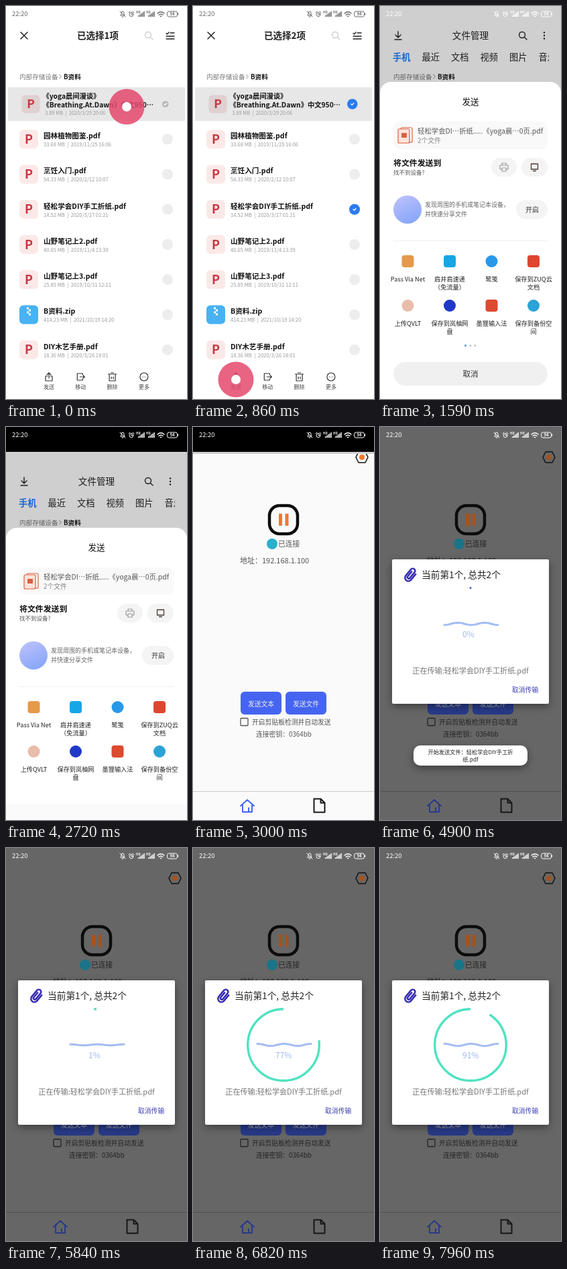
Animation of 270 by 585 pixels, one loop 8 s. Source, as an HTML page with a canvas:

```html
<!DOCTYPE html>
<html lang="zh-CN">
<head>
<meta charset="utf-8">
<style>
html, body { margin: 0; width: 100%; height: 100%; overflow: hidden; background: #fff; }
canvas { display: block; width: 100vw; height: 100vh; }
</style>
</head>
<body>
<canvas id="stage"></canvas>
<script>
const W = 270, H = 585, LOOP = 8000;
const canvas = document.getElementById('stage');
const c = canvas.getContext('2d');
const ratio = window.devicePixelRatio || 1;
canvas.width = W * ratio;
canvas.height = H * ratio;

// The screen refreshes at uneven moments: [first, last, count]
const ticks = [
  [0, 0, 1], [80, 80, 1], [290, 530, 4], [740, 1380, 12], [1590, 1590, 1], [1710, 1990, 5],
  [2270, 2510, 3], [2720, 2720, 1], [2800, 3200, 6], [3240, 3400, 2], [3560, 4080, 8],
  [4240, 4450, 2], [4700, 4900, 4], [4980, 5140, 2], [5300, 5550, 2], [5840, 6040, 3],
  [6200, 6410, 2], [6660, 6820, 3], [6940, 7060, 2], [7270, 7430, 2], [7680, 7960, 4]
].flatMap(([a, b, n]) => Array.from({ length: n }, (_, i) => n > 1 ? a + (b - a) * i / (n - 1) : a));

const mix = (a, b, k) => a + (b - a) * k;

// Piecewise linear value over time
function track(t, points) {
  if (t <= points[0][0]) return points[0][1];
  for (let i = 1; i < points.length; i++) {
    const [t0, a] = points[i - 1], [t1, b] = points[i];
    if (t < t1) return mix(a, b, (t - t0) / (t1 - t0));
  }
  return points[points.length - 1][1];
}

function text(s, x, y, size, color, weight = 400, align = 'left') {
  c.font = `${weight} ${size}px "Noto Sans CJK SC", "Noto Sans CJK", sans-serif`;
  c.fillStyle = color;
  c.textAlign = align;
  c.fillText(s, x, y + size * 0.37);
}
const centered = (s, x, y, size, color, weight) => text(s, x, y, size, color, weight, 'center');

function box(x, y, w, h, r, color) {
  c.beginPath();
  c.roundRect(x, y, w, h, r);
  c.fillStyle = color;
  c.fill();
}
function card(x, y, w, h, r, color) {
  c.save();
  c.shadowColor = 'rgba(0,0,0,.4)';
  c.shadowBlur = 12 * ratio;
  c.shadowOffsetY = 4 * ratio;
  box(x, y, w, h, r, color);
  c.restore();
}
function frame(x, y, w, h, r, color, width) {
  c.beginPath();
  c.roundRect(x, y, w, h, r);
  c.strokeStyle = color;
  c.lineWidth = width;
  c.stroke();
}
function disc(x, y, r, color) {
  c.beginPath();
  c.arc(x, y, r, 0, Math.PI * 2);
  c.fillStyle = color;
  c.fill();
}
function icon(d, x, y, color, width = 1.3, turn = 0) {
  c.save();
  c.translate(x, y);
  c.rotate(turn);
  c.strokeStyle = color;
  c.lineWidth = width;
  c.lineCap = c.lineJoin = 'round';
  c.stroke(new Path2D(d));
  c.restore();
}
function layer(draw, { dx = 0, dy = 0, alpha = 1, scale = 1 } = {}) {
  c.save();
  c.translate(dx, dy);
  c.scale(scale, scale);
  c.globalAlpha = alpha;
  draw();
  c.restore();
}
const shade = alpha => box(0, 0, W, H, 0, `rgba(0,0,0,${alpha})`);

const ICONS = {
  close: 'M-5-5L5 5M5-5L-5 5',
  search: 'M3.5-1A4.5 4.5 0 1 1-5.5-1A4.5 4.5 0 1 1 3.5-1M2.5 2.5L6 6',
  checklist: 'M-6-3.5l1.5 1.5 2.5-3M0-4h6M-6 1h12M-6 5h12',
  download: 'M0-6V3M-4-1L0 3L4-1M-5 6H5',
  send: 'M-2-1H-5V6H5V-1H2M0 2V-6M-3-3L0-6L3-3',
  move: 'M3-3V-5H-5V5H3V3M-1 0H6M4-2L6 0L4 2',
  trash: 'M-6-4H6M-4.5-4V6H4.5V-4M-2-6H2M-1.5 0V3M1.5 0V3',
  more: 'M6 0A6 6 0 1 1-6 0A6 6 0 1 1 6 0M-2.5 0h.1M0 0h.1M2.5 0h.1',
  tick: 'M-2 0L-.5 1.5L2-1.5',
  printer: 'M-3-3V-6H3V-3M-3 3H-6V-3H6V3H3M-3 1H3V6H-3Z',
  monitor: 'M-5-5H5V3H-5ZM-2 5.5H2',
  clip: 'M5-6V5A5 5 0 0 1-5 5V-7A3.5 3.5 0 0 1 2-7V4A2 2 0 0 1-2 4V-5',
  bell: 'M-3 2H3L2 0V-2A2 2 0 0 0-2-2V0ZM-1 4H1M-4-4L4 4',
  alarm: 'M3 .5A3 3 0 1 1-3 .5A3 3 0 1 1 3 .5M0-1V.5H1.5M-4-2L-2-4M4-2L2-4',
  hexagon: 'M-9 0L-5-8H5L9 0L5 8H-5Z',
  home: 'M-10 0L0-9L10 0M-7-1V9H7V-1M2 9V3',
  page: 'M2-10H-8V10H8V-4ZM2-10V-4H8'
};

function statusBar(color) {
  text('22:20', 9, 12, 9.4, color, 500);
  icon(ICONS.bell, 174, 12, color, 1);
  icon(ICONS.alarm, 187, 12, color, 1);
  for (const x of [194, 209]) {
    text('HD', x, 9, 4.5, color, 600);
    for (let i = 0; i < 5; i++) box(x + 3 + i * 2.1, 14 - i * 1.5, 1.4, 2 + i * 1.5, 0, color);
  }
  icon('M-5-1.5Q0-6 5-1.5M-3 .8Q0-2 3 .8M-.8 3L0 2.5L.8 3', 231, 12.5, color, 1.4);
  frame(240.5, 8, 15, 8, 2.8, color, 1);
  box(256.2, 10.5, 1, 3, 0, color);
  centered('94', 248, 12, 6, color, 600);
}

const FILES = [
  ['《Breathing.At.Dawn》中文950…', '3.89 MB  |  2020/3/29 20:06'],
  ['园林植物图鉴.pdf', '33.68 MB  |  2019/11/25 16:06'],
  ['烹饪入门.pdf', '54.33 MB  |  2020/2/12 10:07'],
  ['轻松学会DIY手工折纸.pdf', '14.52 MB  |  2020/3/27 01:21'],
  ['山野笔记上2.pdf', '40.65 MB  |  2019/11/4 13:39'],
  ['山野笔记上3.pdf', '25.85 MB  |  2019/10/31 12:11'],
  ['B资料.zip', '414.23 MB  |  2021/10/19 14:20'],
  ['DIY木艺手册.pdf', '18.36 MB  |  2020/3/26 18:01']
];

function fileRow([name, info], i, selected, fresh) {
  const first = i === 0;
  if (name.endsWith('zip')) {
    box(20, -14, 28, 28, 6, '#48b2f2');
    for (let k = 0; k < 4; k++) box(k % 2 ? 34 : 31, -11 + k * 3, 3, 3, 0, '#fff');
  } else {
    box(20, -14, 28, 28, 6, first ? '#dfd0d1' : '#fbe9e8');
    centered('P', 34, 0, 18, '#cb3440', 700);
  }
  if (first) text('《yoga晨间漫谈》', 52, -12, 10.6, '#111', 600);
  text(name, first ? 52 : 56, first ? 1 : -5, 10.6, '#111', 600);
  text(info, 56, first ? 14 : 8, 7.6, '#999');
  disc(241, 0, fresh ? 5 : 8, fresh ? '#b9b9b9' : selected ? '#2b7cf0' : '#ededed');
  if (selected) icon(ICONS.tick, 241, 0, '#fff', 1.2);
}

function selectionHeader(count) {
  icon(ICONS.close, 27, 44, '#222', 1.5);
  centered(`已选择${count}项`, 137, 44, 13.5, '#222', 600);
  icon(ICONS.search, 213, 44, '#ccc');
  icon(ICONS.checklist, 245, 44, '#222');
}

function browseHeader() {
  icon(ICONS.download, 27, 44, '#222', 1.4);
  centered('文件管理', 135, 44, 13.6, '#222', 500);
  icon(ICONS.search, 213, 44, '#222', 1.4);
  for (const y of [39.5, 44, 48.5]) disc(245, y, 1.2, '#222');
  c.save();
  c.beginPath();
  c.rect(0, 60, 252, 30);
  c.clip();
  ['手机', '最近', '文档', '视频', '图片', '音乐'].forEach((tab, i) =>
    text(tab, 19 + i * 43.5, 76, 13.2, i ? '#222' : '#1c7dff', i ? 500 : 600));
  c.restore();
}

function toolbar() {
  box(0, 532, W, 53, 0, '#fff');
  [['send', '发送'], ['move', '移动'], ['trash', '删除'], ['more', '更多']].forEach(([name, label], i) => {
    const x = 64 + i * 47.3;
    icon(ICONS[name], x, 552, '#333', 1.2);
    centered(label, x, 567, 8, '#444');
  });
}

function filesPage(t) {
  const two = t >= 450;
  box(0, 0, W, H, 0, '#fff');
  if (t < 1100) selectionHeader(two ? 2 : 1);
  else browseHeader();
  text('内部存储设备', 20, 105, 9.6, '#777');
  icon('M-1.5-3L1.5 0L-1.5 3', 81, 105, '#888', 1);
  text('B资料', 86, 105, 9.6, '#111', 600);
  box(3, 121, 264, 50, 0, '#e7e7e7');
  FILES.forEach((file, i) => {
    const pressed = i === 0;
    layer(() => fileRow(file, i, pressed || (i === 3 && two), pressed && t < 80),
      { dx: pressed ? 4 : 0, dy: 146 + i * 52.25, scale: pressed ? 0.97 : 1 });
  });
  toolbar();
  shade(track(t, [[1100, 0], [1380, 0.1], [1590, 0.19]]));
}

const APPS = [
  ['#e59a4a', 0, 'Pass Via Net'], ['#16a6e6', 0, '肩并肩速递', '（免流量）'],
  ['#2898ea', 1, '鹭笺'], ['#de4630', 0, '保存到ZUQ云', '文档'],
  ['#e8bda9', 1, '上传QVLT'], ['#2038c8', 1, '保存到岚柚网', '盘'],
  ['#dc4a30', 0, '墨狸输入法'], ['#2ba3d6', 1, '保存到备份空', '间']
];

function shareSheet(leaving) {
  box(0, 113, W, 600, [16, 16, 0, 0], '#fff');
  centered('发送', 135, 142, 12.6, '#111', 500);
  box(20, 172, 230, 41, 10, '#f9f9f9');
  frame(31, 181, 17, 22, 2, '#d9603f', 1.2);
  box(27, 183, 17, 21, 2, '#fbe3da');
  frame(27, 183, 17, 21, 2, '#d9603f', 1.2);
  box(32, 189, 8, 7, 1, '#d9603f');
  text('轻松学会DI…折纸.....《yoga晨…0页.pdf', 56, 186, 10.4, '#555');
  text('2个文件', 56, 200, 9.8, '#888');
  text('将文件发送到', 20, 234, 11.9, '#111', 600);
  text('找不到设备?', 20, 248, 8.5, '#555');
  box(166, 226, 38, 28, 14, '#f4f4f4');
  box(211, 226, 39, 28, 14, '#f4f4f4');
  icon(ICONS.printer, 185, 240, '#999', 1.2);
  icon(ICONS.monitor, 230.5, 240, '#4a3a36', 1.3);
  const glow = c.createLinearGradient(30, 284, 50, 324);
  glow.addColorStop(0, '#b9bffa');
  glow.addColorStop(1, '#86a5fb');
  disc(41, 303, 21, glow);
  text('发现周围的手机或笔记本设备，', 67, 296, 9, '#666');
  text('并快速分享文件', 67, 310, 9, '#666');
  box(203, 289, 47, 28, 14, '#f4f4f4');
  centered('开启', 227, 303, 10, '#333', 500);
  box(20, 349, 230, 1, 0, '#efefef');
  APPS.forEach(([color, round, ...label], i) => {
    const x = 41.5 + (i % 4) * 62.5, y = 380 + (i >> 2) * 66;
    if (round) disc(x, y, 9, color);
    else box(x - 9, y - 9, 18, 18, 4, color);
    label.forEach((line, k) => centered(line, x, y + 27 + k * 12, 9.2, '#222'));
  });
  if (leaving) return;
  [127.5, 135, 142].forEach((x, i) => disc(x, 505.5, 1.7, i ? '#ccc' : '#6f9df5'));
  box(20, 530, 230, 35, 17.5, '#f0f0f0');
  centered('取消', 135, 548, 11.6, '#333', 500);
}

const LIT = { paper: '#fafafa', orange: '#f0792c', teal: '#2ab0cc', blue: '#4565f0', label: '#eee', ink: '#555', line: '#ccc' };
const DIM = { paper: '#666', orange: '#a4531f', teal: '#1a7488', blue: '#283a88', label: '#aaa', ink: '#242424', line: '#505050' };

function transferPage({ paper, orange, teal, blue, label, ink, line }) {
  box(0, 0, W, H, 0, paper);
  icon(ICONS.hexagon, 252, 45, '#111', 1.5);
  disc(252, 45, 4, orange);
  frame(114, 117, 42, 42, 15, '#0c0c0c', 4.5);
  box(128, 129, 5, 18, 1, orange);
  box(137.5, 129, 5, 18, 1, orange);
  disc(118, 174, 8, teal);
  text('已连接', 127, 174, 10.8, ink);
  text('地址：192.168.1.100', 70, 199, 11, ink, 500);
  [['发送文本', 71], ['发送文件', 138]].forEach(([name, x]) => {
    box(x, 394, 61, 34, 6, blue);
    centered(name, x + 30.5, 412, 9.8, label, 500);
  });
  frame(71, 433.5, 11, 11, 1, ink, 1.3);
  text('开启剪贴板检测并自动发送', 88, 439, 9.8, ink);
  text('连接密钥：0364bb', 94, 457, 9.8, ink);
  box(0, 542, W, 1, 0, line);
  icon(ICONS.home, 81, 564, blue, 2);
  icon(ICONS.page, 188.5, 563.5, '#161616', 2);
}

// The new window is uncovered from the bottom up, then darkened for the dialog
function openTransfer(t) {
  const top = track(t, [[2720, 561], [2800, 430], [2880, 200], [2960, 40], [3040, 0]]);
  c.save();
  c.beginPath();
  c.rect(0, top, W, H);
  c.clip();
  box(0, 0, W, H, 0, LIT.paper);
  layer(() => transferPage(LIT), { alpha: track(t, [[2720, 0], [2880, 1]]) });
  shade(track(t, [[2960, 0], [3160, 0.625]]));
  c.restore();
}

function progressView(t) {
  const shrink = track(t, [[3040, 0], [3320, 1]]);
  const flat = track(t, [[3480, 0], [3800, 1]]);
  const done = track(t, [[5825, 0], [6820, 0.77], [7060, 0.865], [7960, 0.91]]);
  const ink = flat < 1 ? '#5edcc0' : '#a3bdf2';
  c.lineCap = c.lineJoin = 'round';
  c.lineWidth = 3;
  c.strokeStyle = ink;
  c.beginPath();
  if (flat < 1) {
    const endY = mix(307, 293, flat), reach = mix(15, 40, flat);
    c.moveTo(135 - reach, endY);
    c.lineTo(135, mix(321, 293, flat));
    c.lineTo(135 + reach, endY);
  } else {
    const swing = 1.7 * Math.cos((t - 4900) / 560 * Math.PI * 2);
    for (let x = 96; x <= 176; x += 2) c.lineTo(x, 293 + swing * Math.cos((x - 96) / 40 * Math.PI * 2));
  }
  c.stroke();
  if (shrink < 1) {
    const half = 26 * (1 - shrink);
    c.beginPath();
    c.moveTo(135, 293 - half);
    c.lineTo(135, 293 + half);
    c.stroke();
  } else if (done === 0) {
    disc(135, track(t, [[3560, 293], [4000, 239.5]]), 1.7, flat < 1 ? ink : '#6d6fd6');
  }
  if (t >= 4080) text(`${Math.round(done * 100)}%`, 123, 309, 12, '#a0baf0');
  if (done > 0) {
    const top = -Math.PI / 2;
    c.beginPath();
    c.arc(135, 293, 53.3, top, top - done * Math.PI * 2, true);
    c.strokeStyle = '#50e2c2';
    c.lineWidth = 3.4;
    c.lineCap = 'butt';
    c.stroke();
  }
}

function dialog(t) {
  card(18, 197, 234, 215, 2, '#fff');
  icon(ICONS.clip, 45.5, 220.5, '#3a30b4', 2.6, 0.7);
  text('当前第1个, 总共2个', 62, 220, 13.7, '#222', 500);
  progressView(t);
  centered('正在传输:轻松学会DIY手工折纸.pdf', 135, 363, 11.1, '#777');
  text('取消传输', 197, 391, 9.8, '#3d3db4', 500);
}

function toast(t) {
  if (t < 3160 || t >= 5300) return;
  const small = t < 3240 || t >= 5140;
  layer(() => {
    card(-85, -15, 170, 30, 10, '#fff');
    centered('开始发送文件：轻松学会DIY手工折', 0, -5, 8.2, '#222');
    centered('纸.pdf', 0, 6, 8.2, '#222');
  }, { dx: 135, dy: small ? 494.5 : 489, scale: small ? 0.905 : 1 });
}

const TOUCHES = [[180, 150, -200, 200], [180, 303, 330, 600], [64, 556, 780, 1030], [42, 390, 2270, 2600]];

function touches(t) {
  for (const [x, y, on, off] of TOUCHES) {
    if (t < on || t > off) continue;
    layer(() => disc(x, y, 26.5, '#e4496d'), { alpha: 0.85 });
    disc(x, y, 7, '#fff');
  }
}

function draw(t) {
  const leaving = t >= 2720;
  if (t < 3040) {
    const slide = leaving ? 37 : 0;
    const top = track(t, [[1000, H], [1130, 300], [1230, 160], [1380, 113]]);
    box(0, 0, W, H, 0, '#000');
    layer(() => {
      filesPage(t);
      if (top < H) layer(() => shareSheet(leaving), { dy: top - 113 });
    }, { dy: slide });
  }
  if (leaving) {
    if (t < 3400) openTransfer(t);
    else transferPage(DIM);
    if (t >= 3000) layer(() => dialog(t), { alpha: track(t, [[2960, 0], [3120, 1]]) });
    toast(t);
  }
  statusBar(t < 1590 ? '#666' : '#fff');
  touches(t);
}

function play() {
  const now = performance.now() % LOOP;
  c.setTransform(ratio, 0, 0, ratio, 0, 0);
  draw(ticks.findLast(tick => tick <= now));
  requestAnimationFrame(play);
}
play();
</script>
</body>
</html>
```
